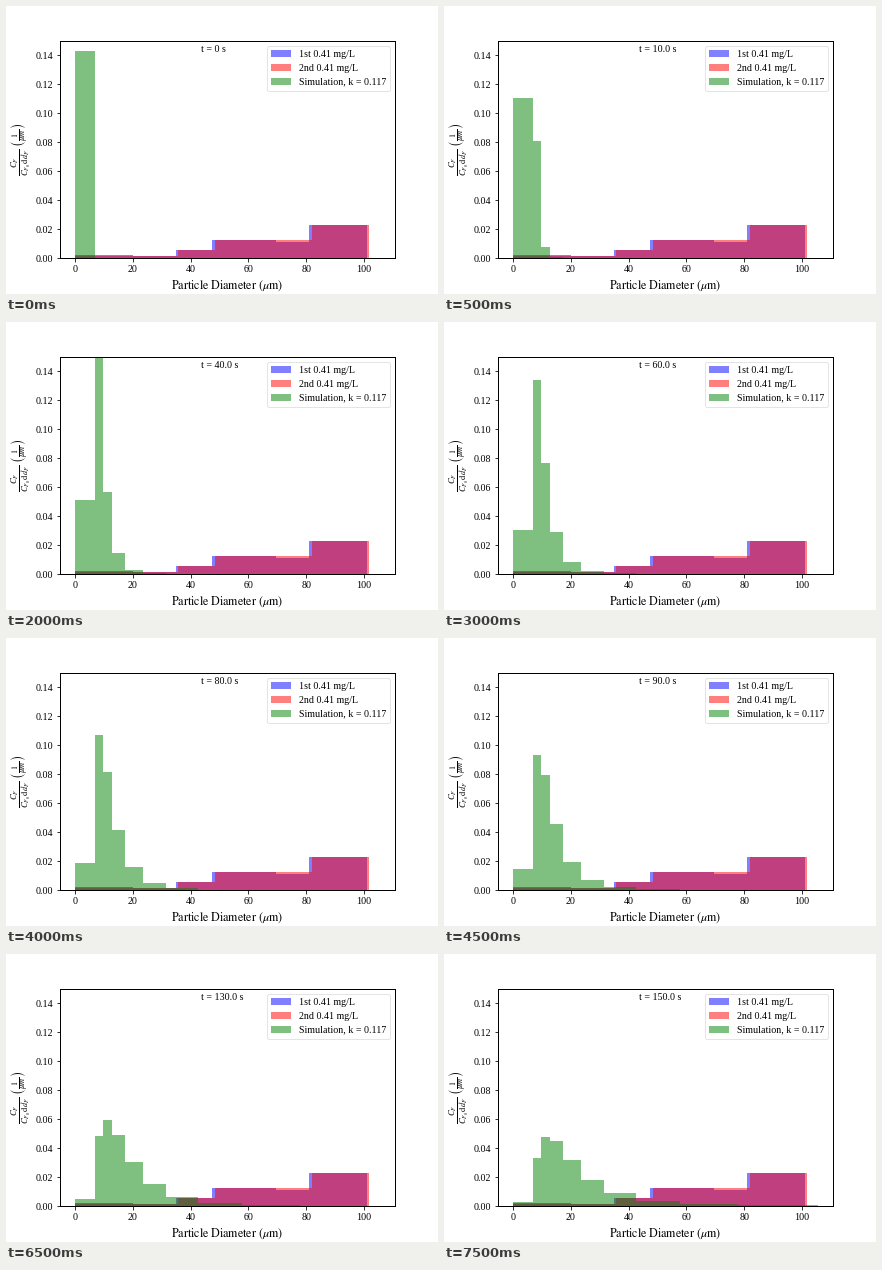
A matplotlib script that plays this animation: 432x288 px, repeating every 8 s.

```python
import math

import matplotlib.pyplot as plt
import numpy as np
from matplotlib.animation import FuncAnimation

plt.rcParams.update({
    "font.family": "Liberation Serif",
    "font.size": 10,
    "mathtext.fontset": "stix",
    "axes.labelsize": 12,
    "axes.linewidth": 1.0,
    "legend.edgecolor": "0.87",
})

FRAMES, INTERVAL = 16, 500
DT = 10.0            # simulated seconds per frame
RATE = 0.02568       # doublings per second
D0, FRACTAL = 7.0, 2.3
BINS = 10

edges = np.r_[0, D0 * 2 ** (np.arange(BINS) / FRACTAL)]


def density(t):
    """Poisson mass fractions per unit width; the last bin keeps the tail."""
    mu = RATE * t
    mass = [math.exp(-mu) * mu ** k / math.factorial(k) for k in range(BINS - 1)]
    return np.array(mass + [max(0.0, 1 - sum(mass))]) / np.diff(edges)


def histogram(ax, bounds, heights, color, label):
    return ax.bar(bounds[:-1], heights, np.diff(bounds), align="edge",
                  color=color, alpha=0.5, label=label)


def measured(ax, steps, color, label):
    """Steps are (right edge, height) pairs starting from zero."""
    ends, heights = zip(*steps)
    return histogram(ax, [0, *ends], heights, color, label)


fig = plt.figure(figsize=(6, 4), dpi=72, facecolor="white")
fig.subplots_adjust(left=0.125, right=0.9, bottom=0.125, top=0.88)
ax = fig.add_subplot()

low, mid, high = 0.0055, 0.0124, 0.0228
measured(ax, [(20, 0.0018), (35, 0.0013), (47.5, low), (69.7, mid),
              (81, 0.9 * mid), (101, high)], "blue", "1st 0.41 mg/L")
measured(ax, [(20, 0.0014), (35.5, 0.0013), (48.4, low), (82, mid),
              (101.8, high)], "red", "2nd 0.41 mg/L")
bars = histogram(ax, edges, density(0), "green", "Simulation, k = 0.117")

span = edges[-1]
ax.set_xlim(-0.05 * span, 1.05 * span)
ax.set_ylim(0, 0.15)
ax.set_xticks(np.arange(0, 101, 20))
ax.set_yticks(np.arange(8) * 0.02)
ax.yaxis.set_major_formatter("{x:.2f}")
ax.set_xlabel(r"$\text{Particle Diameter (}\mu\text{m)}$")
ax.set_ylabel(r"$\frac{C_F}{C_{F_0}\,\mathrm{d}d_F}\ \left(\frac{1}{\mu m}\right)$",
              labelpad=1)
ax.legend(loc="upper right")
clock = ax.text(0.42, 0.947, "", transform=ax.transAxes)


def update(i):
    t = i * DT
    for bar, h in zip(bars, density(t)):
        bar.set_height(h)
    clock.set_text(f"t = {t:.1f} s" if i else "t = 0 s")
    return [*bars, clock]


anim = FuncAnimation(fig, update, frames=FRAMES, interval=INTERVAL,
                     repeat=True, repeat_delay=0)
plt.show()
```
